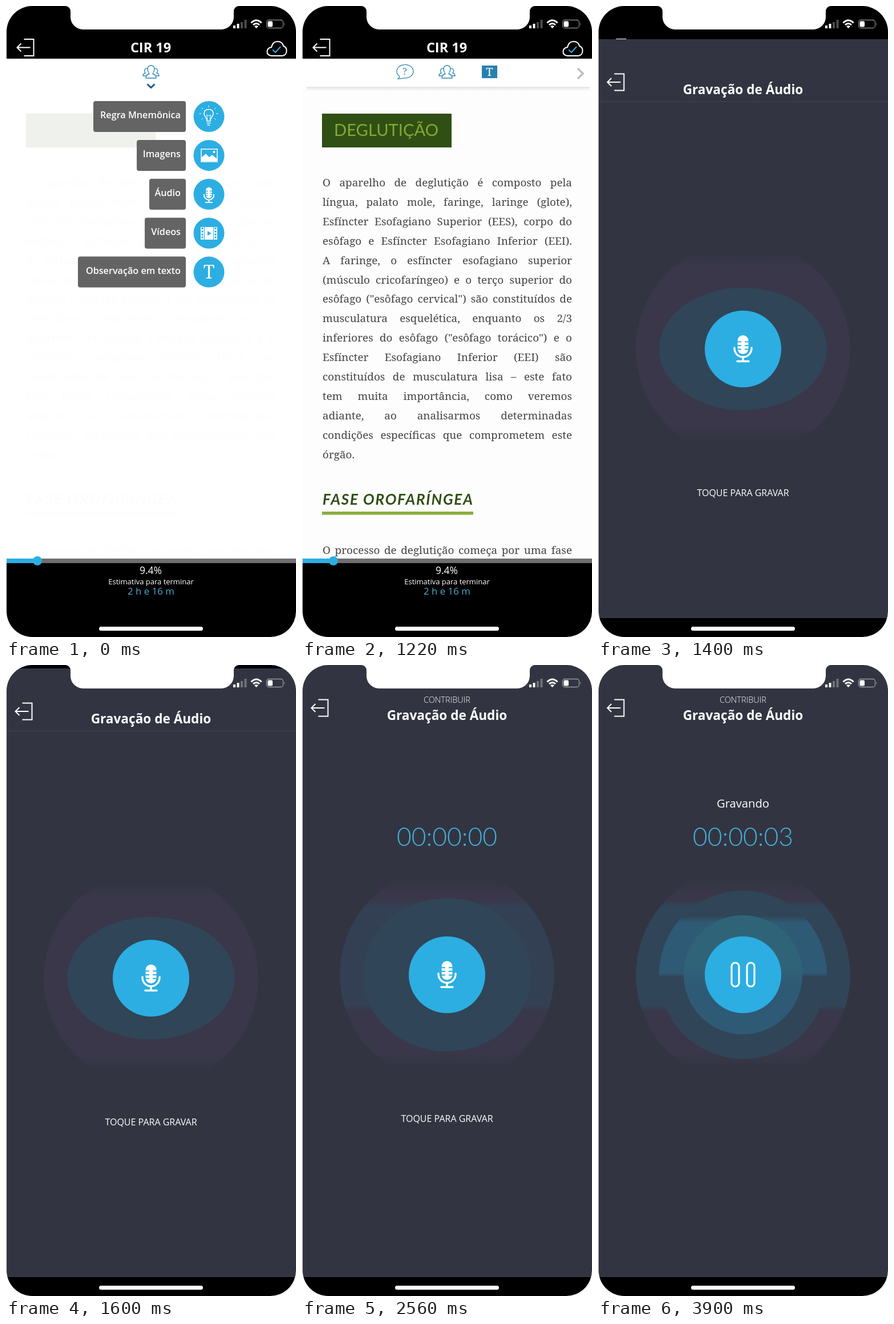
An HTML page for the animation above (3940 ms loop, 508 by 1102 pixels).

```html
<!DOCTYPE html>
<html lang="pt">
<head>
<meta charset="utf-8">
<title>Gravação de Áudio</title>
<style>
html, body { margin: 0; width: 100%; height: 100%; overflow: hidden; background: #fff; }
svg { display: block; width: 100vw; height: 100vh; }
text { font-family: "Open Sans", "Noto Sans", sans-serif; fill: #fff; }
.mid { text-anchor: middle; }
.b { font-weight: 700; }
.lato { font-family: Lato, sans-serif; }
.serif { font-family: "Noto Serif", serif; text-anchor: middle; }
.line { fill: none; stroke: #fff; stroke-width: 2; }
.blue { fill: none; stroke: #2f86b4; stroke-width: 1.3; }
.row { font: 18.9px/33.9px "Noto Serif", serif; color: #444; white-space: nowrap; text-align-last: justify; }
.row.last { text-align-last: left; }
</style>
</head>
<body>
<svg viewBox="0 0 508 1102" preserveAspectRatio="none">
  <defs>
    <g id="mic">
      <rect x="-9.5" y="-24" width="19" height="33" rx="9.5" fill="#fff"/>
      <path d="M-10-12.5H-3M3-12.5H10M-10-6H-3M3-6H10M-10 .5H-3M3 .5H10" stroke="#2caee2" stroke-width="2.2"/>
      <path d="M-15-2V-1A15 15 0 0 0 15-1V-2M0 14V21M-10 21.5H10" fill="none" stroke="#fff" stroke-width="3.4" stroke-linecap="round"/>
    </g>
    <path id="back" class="line" d="M13 1H30V30H13M24 15.5H1M8 8.5L1 15.5L8 22.5"/>
    <linearGradient id="haze" gradientUnits="userSpaceOnUse" x1="0" y1="354" x2="0" y2="728">
      <stop offset=".06" stop-color="#3a374a" stop-opacity="0"/>
      <stop offset=".12" stop-color="#3a374a"/>
      <stop offset=".86" stop-color="#3a374a"/>
      <stop offset=".93" stop-color="#3a374a" stop-opacity="0"/>
    </linearGradient>
    <linearGradient id="band" gradientUnits="userSpaceOnUse" x1="0" y1="354" x2="0" y2="728">
      <stop offset=".15" stop-color="#304558" stop-opacity="0"/>
      <stop offset=".18" stop-color="#304558"/>
      <stop offset=".64" stop-color="#304558"/>
      <stop offset=".67" stop-color="#304558" stop-opacity="0"/>
    </linearGradient>
    <linearGradient id="arch" gradientUnits="userSpaceOnUse" x1="0" y1="394" x2="0" y2="688">
      <stop offset=".15" stop-color="#2f5a75" stop-opacity="0"/>
      <stop offset=".19" stop-color="#2f5a75"/>
      <stop offset=".49" stop-color="#2f5a75"/>
      <stop offset=".51" stop-color="#2f5a75" stop-opacity="0"/>
    </linearGradient>
    <linearGradient id="deep" x1="0" y1="0" x2="0" y2="1">
      <stop offset=".4" stop-color="#2f6478"/>
      <stop offset=".6" stop-color="#2f5a75"/>
    </linearGradient>
    <linearGradient id="fall" x1="0" y1="0" x2="0" y2="1">
      <stop offset="0" stop-color="#e2e2e2"/>
      <stop offset="1" stop-color="#fff"/>
    </linearGradient>
  </defs>

  <rect width="508" height="1102" fill="#fdfdfd"/>

  <!-- reading page -->
  <rect x="35" y="188" width="227" height="59" fill="#304f14"/>
  <g id="words">
    <text class="lato" x="56" y="227" font-size="29.200" style="fill:#84a934">DEGLUTIÇÃO</text>
    <foreignObject x="36" y="292" width="437" height="520"><div id="copy" xmlns="http://www.w3.org/1999/xhtml"></div></foreignObject>
    <text class="lato b" x="36" y="871" font-size="26.200" font-style="italic" letter-spacing="1.700" style="fill:#304f14">FASE OROFARÍNGEA</text>
    <rect x="35" y="883" width="265" height="5.500" fill="#8aad3e"/>
    <foreignObject x="36" y="934" width="437" height="36"><div id="next" xmlns="http://www.w3.org/1999/xhtml"></div></foreignObject>
  </g>

  <rect id="veil" y="92" width="508" height="874" fill="#fff"/>

  <!-- toolbar -->
  <rect y="92" width="508" height="50" fill="#fff"/>
  <g id="tools">
    <rect x="8" y="141" width="496" height="8" fill="url(#fall)"/>
    <path class="blue" d="M171 123A14.500 11.700 0 1 1 179 125.800Q173 127 168 127Q171 125 171 123Z"/>
    <text class="serif" x="180" y="120" font-size="16" style="fill:#2f86b4">?</text>
    <rect x="315" y="104" width="27" height="22" fill="#2781ac"/>
    <text class="serif" x="328.500" y="122" font-size="20">T</text>
    <path d="M483 109L492 118L483 127" fill="none" stroke="#bdbdbd" stroke-width="3.500"/>
  </g>
  <g class="blue">
    <path d="M245 126Q245 120 251 118.500Q248 114 248 110Q248 104 254 104Q260 104 260 110Q260 114 257 118.500Q263 120 263 126Z"/>
    <path d="M245 122H240Q240 118 244 117Q242 114 243 111Q245 108 248 110M263 122H268Q268 118 264 117Q266 114 265 111Q263 108 260 110"/>
  </g>

  <!-- contribution menu -->
  <g id="menu">
    <path d="M247.500 136.500L254 142.500L260.500 136.500" fill="none" stroke="#1d5c8c" stroke-width="3"/>
    <g id="items"></g>
    <g class="line" style="stroke-width:1.600">
      <path d="M352 201Q352 197 349.500 194Q347 191 347 188Q347 180.500 355 180.500Q363 180.500 363 188Q363 191 360.500 194Q358 197 358 201ZM351.500 204.500H358.500M352.500 208H357.500"/>
      <path d="M353 199L351.500 190L355 192L358.500 190L357 199" stroke-width="1"/>
      <path d="M355 177V173.500M345 180L342.500 177.500M365 180L367.500 177.500M342 188H338.500M368 188H371.500M345 196L342.500 198.500M365 196L367.500 198.500" stroke-width="1"/>
    </g>
    <rect x="342" y="250" width="28" height="22" class="line" style="stroke-width:1.500"/>
    <path d="M342 271V265L350 258L356 264L361 260L370 267V271Z" fill="#fff"/>
    <circle cx="364.500" cy="255" r="2" fill="#fff"/>
    <use href="#mic" transform="translate(355.500 330.500) scale(.58)"/>
    <rect x="341" y="386" width="29" height="22" fill="#fff"/>
    <path d="M344 387V408M367 387V408" stroke="#2caee2" stroke-width="3" stroke-dasharray="3 2.200"/>
    <path d="M347.500 386V408M363.500 386V408" stroke="#2caee2"/>
    <path d="M353 393L360 397L353 401Z" fill="#2caee2"/>
    <text class="serif" x="355.500" y="476" font-size="32">T</text>
  </g>

  <!-- header and footer -->
  <rect width="508" height="92" fill="#000"/>
  <use href="#back" x="18.500" y="57"/>
  <text class="mid b" x="253.500" y="80.500" font-size="23.500">CIR 19</text>
  <path class="line" d="M465 87Q457 86 457.500 79Q458 73 465 72Q467 62 476 62Q484 62 486 70Q492 72 491.500 79Q491 86 484 87Z"/>
  <path d="M467 76.500L472 81L481 71" fill="none" stroke="#2caee2" stroke-width="2"/>
  <rect y="965" width="508" height="137" fill="#000"/>
  <rect y="965" width="508" height="8" fill="#706d70"/>
  <rect y="965" width="55" height="8" fill="#2caee2"/>
  <circle cx="55" cy="969" r="8" fill="#2caee2"/>
  <text class="mid" x="253.500" y="992" font-size="17.500">9.4%</text>
  <text class="mid" x="254" y="1010" font-size="13">Estimativa para terminar</text>
  <text class="mid" x="254" y="1028" font-size="16.900" style="fill:#4ba9cf">2 h e 16 m</text>

  <!-- recorder -->
  <g id="sheet">
    <rect width="508" height="1102" fill="#323541"/>
    <path id="rule" d="M0 109H508" stroke="#454854"/>
    <use href="#back" x="15.500" y="59.500"/>
    <text class="mid" id="over" x="254" y="65.500" font-size="14.500" font-weight="300">CONTRIBUIR</text>
    <text class="mid b" x="254" y="95.500" font-size="22.600">Gravação de Áudio</text>
    <text class="mid" id="live" x="254" y="248.500" font-size="20.200">Gravando</text>
    <text class="mid lato" id="clock" x="254" y="316" font-size="44.500" font-weight="300" style="fill:#44aedb">00:00:00</text>
    <circle cx="254" cy="541" r="187.500" fill="url(#haze)"/>
    <circle id="wide" cx="254" cy="541" r="187.500" fill="url(#band)"/>
    <ellipse id="ring" cx="254" cy="541" rx="147" fill="#304558"/>
    <circle id="glow" cx="254" cy="541" r="147" fill="url(#arch)"/>
    <circle id="core" cx="254" cy="541" r="104" fill="url(#deep)"/>
    <circle cx="254" cy="541" r="67" fill="#2caee2"/>
    <g id="idle">
      <use href="#mic" x="254" y="541"/>
      <text class="mid" x="254" y="798" font-size="16">TOQUE PARA GRAVAR</text>
    </g>
    <circle id="tap" cx="254" cy="541" r="14" fill="#4c5a62"/>
    <path id="pause" class="line" d="M234 526.500A6.500 6.500 0 0 1 247 526.500V555A6.500 6.500 0 0 1 234 555ZM261 526.500A6.500 6.500 0 0 1 274 526.500V555A6.500 6.500 0 0 1 261 555Z" style="stroke-width:3.200"/>
  </g>

  <!-- phone frame -->
  <rect y="1069" width="508" height="33" fill="#000"/>
  <rect x="163" y="1084" width="182" height="7" rx="3.500" fill="#fff"/>
  <path d="M398 34H402V39H398ZM404.500 31H408.500V39H404.500Z" fill="#fff"/>
  <path d="M411 28H415V39H411ZM417.500 24H421.500V39H417.500Z" fill="#fff" fill-opacity=".3"/>
  <path d="M429.500 29.500Q438.500 20.500 447.500 29.500M433 33Q438.500 28 444 33" fill="none" stroke="#fff" stroke-width="3"/>
  <path d="M435 35.500Q438.500 32.500 442 35.500L438.500 39Z" fill="#fff"/>
  <rect x="456.500" y="24.500" width="29" height="14" rx="4" fill="none" stroke="#fff" stroke-opacity=".5" stroke-width="1.300"/>
  <rect x="458.500" y="26.500" width="8.500" height="10" rx="2" fill="#fff"/>
  <path d="M487.500 29Q489.500 31.500 487.500 34Z" fill="#fff" fill-opacity=".5"/>
  <path fill="#fff" d="M104 0A9 9 0 0 1 113 9V19A22 22 0 0 0 135 41H377A22 22 0 0 0 399 19V9A9 9 0 0 1 408 0Z"/>
  <path fill="#fff" d="M0 0H46A45 45 0 0 0 1 45V1057A45 45 0 0 0 46 1102H0ZM508 0H463A45 45 0 0 1 508 45ZM508 1102H463A45 45 0 0 0 508 1057Z"/>
</svg>
<script>
const LOOP = 3940, STEP = 20;
const $ = id => document.getElementById(id);

const lines = `O aparelho de deglutição é composto pela
língua, palato mole, faringe, laringe (glote),
Esfíncter Esofagiano Superior (EES), corpo do
esôfago e Esfíncter Esofagiano Inferior (EEI).
A faringe, o esfíncter esofagiano superior
(músculo cricofaríngeo) e o terço superior do
esôfago ("esôfago cervical") são constituídos de
musculatura esquelética, enquanto os 2/3
inferiores do esôfago ("esôfago torácico") e o
Esfíncter Esofagiano Inferior (EEI) são
constituídos de musculatura lisa – este fato
tem muita importância, como veremos
adiante, ao analisarmos determinadas
condições específicas que comprometem este
órgão.`.split("\n");

function addLine(box, text, last) {
  const row = document.createElement("div");
  row.textContent = text;
  row.className = last ? "row last" : "row";
  box.append(row);
}
lines.forEach((text, i) => addLine($("copy"), text, i === lines.length - 1));
addLine($("next"), "O processo de deglutição começa por uma fase");

const items = [["Regra Mnemônica", 153], ["Imagens", 229], ["Áudio", 251], ["Vídeos", 243], ["Observação em texto", 126]];
$("items").innerHTML = items.map(([label, x], i) => {
  const y = 193 + i * 67.9;
  return `<rect x="${x}" y="${y - 27}" width="${315 - x}" height="54" rx="4" fill="#646464"/>
    <text x="306" y="${y + 3}" font-size="16.2" font-weight="600" text-anchor="end">${label}</text>
    <circle cx="355.5" cy="${y}" r="27" fill="#2caee2"/>`;
}).join("");

// piecewise linear value at time t from [time, value] steps
function at(t, steps) {
  let [t0, v0] = steps[0];
  for (const [t1, v1] of steps) {
    if (t < t1) return t <= t0 ? v0 : v0 + (v1 - v0) * (t - t0) / (t1 - t0);
    [t0, v0] = [t1, v1];
  }
  return v0;
}

const slide = [[1220, 1102], [1240, 760], [1260, 470], [1280, 298], [1320, 160], [1400, 58], [1500, 20], [1560, 10], [1600, 6], [1660, 0]];
const fades = {
  veil: [[1040, .92], [1180, 0]],
  words: [[1040, .2], [1180, 1]],
  tools: [[1040, 0], [1180, 1]],
  menu: [[1040, 1], [1180, 0]],
  rule: [[1600, 1], [1800, 0]],
  over: [[1620, 0], [1860, 1]],
  clock: [[1620, 0], [1860, 1]],
  tap: [[2260, 0], [2280, .6], [2360, .6], [2460, 0]],
  wide: [[2280, 0], [2700, 1]],
  idle: [[3100, 1], [3220, 0]],
  pause: [[3120, 0], [3240, 1]],
  live: [[3120, 0], [3260, 1]],
  core: [[3120, 0], [3400, 1]],
  glow: [[3200, 0], [3600, 1]]
};

function draw(t) {
  for (const id in fades) $(id).setAttribute("opacity", at(t, fades[id]));
  $("sheet").setAttribute("transform", `translate(0 ${at(t, slide)})`);
  $("ring").setAttribute("ry", at(t, [[2280, 107], [2700, 147]]));
  const sec = Math.max(0, Math.floor((t - 2340) / 500));
  $("clock").textContent = "00:00:0" + sec;
}

const start = performance.now();
function tick() {
  const t = (performance.now() - start) % LOOP;
  draw(Math.floor(t / STEP) * STEP);
  requestAnimationFrame(tick);
}
tick();
</script>
</body>
</html>
```
